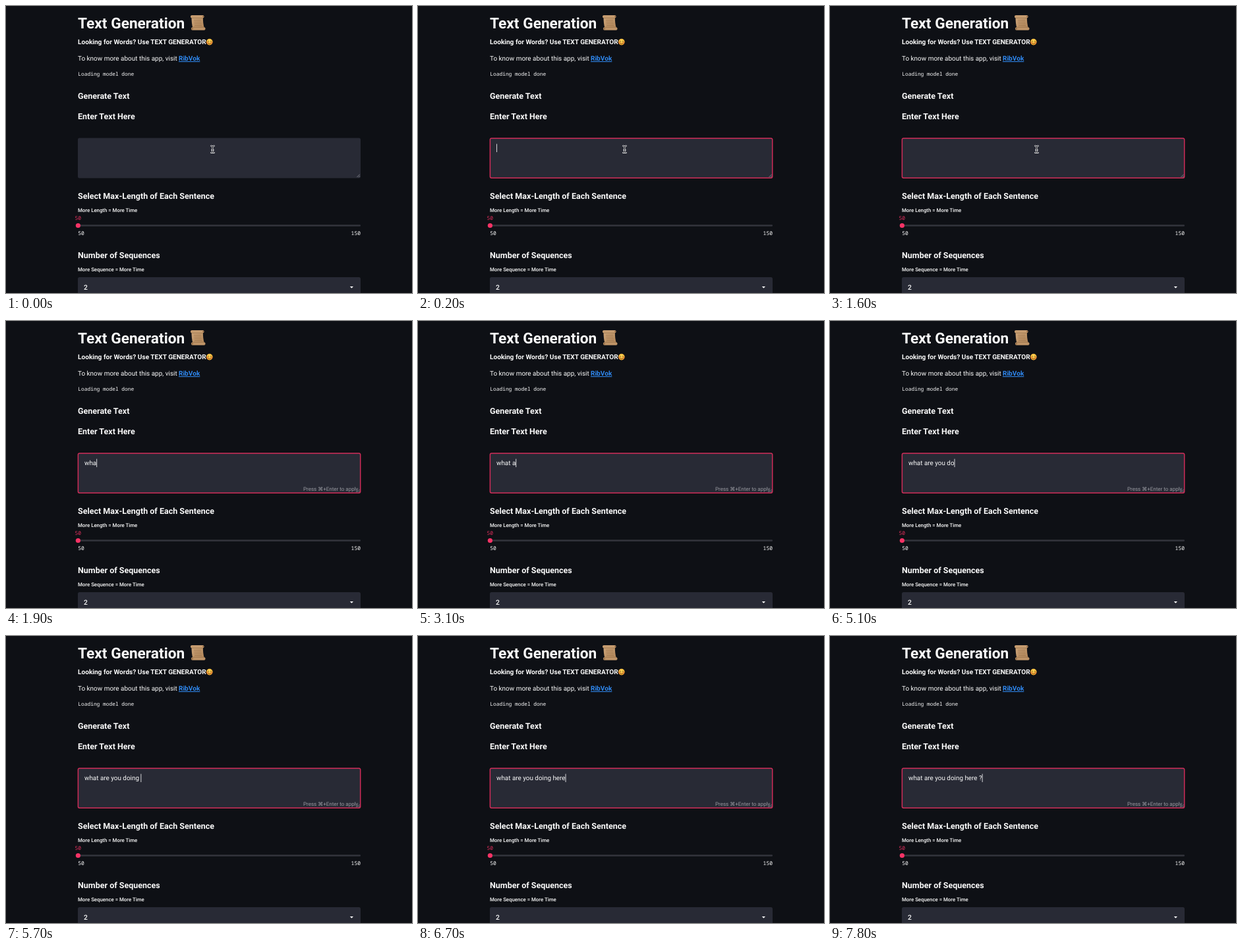
These frames come from a looping animation (616 px wide and 436 px high, 8000 ms). An HTML page:

```html
<!DOCTYPE html>
<html lang="en">
<head>
<meta charset="utf-8">
<title>Text Generation</title>
<style>
  html, body { margin: 0; width: 100%; height: 100%; overflow: hidden; background: #0e1015; }
  svg { display: block; width: 616px; height: 436px; }
  text { font-family: Roboto, "Noto Sans", sans-serif; fill: #fafafa; white-space: pre; text-rendering: geometricPrecision; }
  .title { font-size: 22.7px; font-weight: 700; }
  .bold { font-size: 10.1px; font-weight: 700; }
  .body { font-size: 9.95px; }
  .typed { font-size: 9.88px; }
  .head { font-size: 12.5px; font-weight: 600; }
  .small { font-size: 7.83px; font-weight: 500; }
  .mono { font-family: "Noto Sans Mono", "DejaVu Sans Mono", monospace; font-size: 7.87px; }
  .num { font-size: 8px; font-weight: 500; }
  .link { fill: #2f88f0; text-decoration: underline; }
  .hint { font-family: Roboto, "DejaVu Sans", sans-serif; font-size: 8px; fill: #9899a0; }
  .choice { font-size: 10.3px; font-weight: 500; }
</style>
</head>
<body>
<svg viewBox="0 0 616 436" xmlns="http://www.w3.org/2000/svg">
  <defs>
    <linearGradient id="paper" x1="0" y1="0" x2="1" y2="1">
      <stop offset="0" stop-color="#cda57a"/>
      <stop offset="1" stop-color="#b08558"/>
    </linearGradient>
    <radialGradient id="face" cx=".5" cy=".35" r=".65">
      <stop offset="0" stop-color="#ffdf5a"/>
      <stop offset="1" stop-color="#f0a028"/>
    </radialGradient>
  </defs>
  <rect width="616" height="436" fill="#0e1015"/>

  <text class="title" x="109" y="33.5">Text Generation</text>
  <g id="scroll">
    <path d="M281.5 16H299C298.6 23 299.4 28 301 34H283.5C282 28 281.5 23 281.5 16Z" fill="url(#paper)"/>
    <rect x="280" y="14" width="20.500" height="4.300" rx="2" fill="#c69c70"/>
    <path d="M282 18.300H299" stroke="#8a6540" stroke-width=".6"/>
    <rect x="281" y="32.200" width="21.500" height="4.500" rx="2" fill="#bf9467"/>
    <path d="M283 32.200H301" stroke="#8a6540" stroke-width=".6"/>
    <circle cx="299.300" cy="16.100" r="1.100" fill="#8d6540"/>
    <circle cx="282.800" cy="34.500" r="1.100" fill="#8d6540"/>
    <path d="M285 21.500H296M285.300 24.200H296.300M285.600 26.900H296.700M286 29.600H297" stroke="#9a7249" stroke-width=".7"/>
  </g>

  <text class="bold" x="109" y="58">Looking for Words? Use TEXT GENERATOR</text>
  <g id="smile" fill="none" stroke="#70401a" stroke-width=".8" stroke-linecap="round">
    <circle cx="308.800" cy="54.600" r="4.800" fill="url(#face)" stroke="none"/>
    <circle cx="305.700" cy="56" r="1.300" fill="#f0703c" stroke="none" opacity=".7"/>
    <circle cx="311.900" cy="56" r="1.300" fill="#f0703c" stroke="none" opacity=".7"/>
    <path d="M305.800 54Q306.800 52.500 307.800 54M309.800 54Q310.800 52.500 311.800 54M306.500 56.600Q308.800 59 311.100 56.600"/>
  </g>

  <text class="body" x="109" y="83">To know more about this app, visit</text>
  <text class="bold link" x="262" y="83">RibVok</text>
  <text class="mono" x="109.300" y="105.700">Loading model done</text>
  <text class="head" x="109" y="140.700">Generate Text</text>
  <text class="head" x="109" y="172.300">Enter Text Here</text>

  <rect x="109" y="200.500" width="429" height="61" rx="2.500" fill="#282a35"/>
  <rect id="ring" x="109.400" y="200.900" width="428.300" height="60.300" rx="2.200" fill="none" stroke="#cf2c58" stroke-width="1.500"/>
  <path d="M532.500 260L536.800 255.700M535 260.200L537 258.200" stroke="#92939a" stroke-width=".8"/>
  <text class="hint" id="hint" x="451" y="257.500">Press ⌘+Enter to apply</text>
  <text class="typed" id="typed" x="119" y="219"></text>
  <rect id="caret" y="209.500" width=".9" height="12.500" fill="#e8e8ea"/>
  <g id="pointer" fill="none" stroke-linecap="round">
    <path d="M311.300 212.600Q313.500 212.600 313.500 214.300Q313.500 212.600 315.700 212.600M313.500 214V221.500M311.300 222.900Q313.500 222.900 313.500 221.200Q313.500 222.900 315.700 222.900M312.400 218.800H314.600" stroke="#e4e4e6" stroke-width="2.300"/>
    <path d="M311.500 212.700Q313.500 212.700 313.500 214.300Q313.500 212.700 315.500 212.700M313.500 214V221.500M311.500 222.800Q313.500 222.800 313.500 221.200Q313.500 222.800 315.500 222.800" stroke="#14151a" stroke-width=".9"/>
  </g>

  <text class="head" x="109" y="293">Select Max-Length of Each Sentence</text>
  <text class="small" x="109" y="312.500">More Length = More Time</text>
  <text class="mono num" x="109.300" y="325" text-anchor="middle" style="fill:#e02f5d">50</text>
  <rect x="109" y="332.200" width="429" height="2.500" rx="1.200" fill="#33343c"/>
  <circle cx="109.400" cy="333.500" r="3.600" fill="#f63366"/>
  <text class="mono num" x="109.300" y="348.300">50</text>
  <text class="mono num" x="538" y="348.300" text-anchor="end">150</text>

  <text class="head" x="109" y="383.300">Number of Sequences</text>
  <text class="small" x="109" y="403">More Sequence = More Time</text>
  <rect x="109" y="412" width="429" height="30" rx="2.500" fill="#282a35"/>
  <text class="choice" x="118" y="430.700">2</text>
  <path d="M521.800 426H527L524.400 428.800Z" fill="#fafafa"/>
</svg>
<script>
  const LOOP = 8000, TICK = 100, FOCUS = 100, BLINK = 500, LEFT = 119;
  const message = "what are you doing here ?";
  // Moment each character is typed, in ticks.
  const keys = [17, 18, 19, 21, 23, 31, 33, 35, 36, 42, 43, 45, 47,
                50, 51, 53, 54, 56, 57, 62, 64, 66, 67, 74, 78];

  const el = id => document.getElementById(id);
  const ring = el("ring"), hint = el("hint"), typed = el("typed");
  const caret = el("caret"), pointer = el("pointer");
  const ramp = (t, from, span) => Math.min(1, Math.max(0, (t - from) / span));
  const fade = (node, value) => node.setAttribute("opacity", value);

  function draw(now) {
    const tick = Math.floor((now % LOOP) / TICK);
    const t = tick * TICK;
    const count = keys.filter(k => k <= tick).length;
    const since = t - (count ? keys[count - 1] * TICK : FOCUS);

    typed.textContent = message.slice(0, count);
    const width = count ? typed.getComputedTextLength() : 0;
    caret.setAttribute("x", LEFT + width);
    fade(caret, since >= 0 && since % (2 * BLINK) < BLINK ? 1 : 0);
    fade(ring, ramp(t, 50, 100));
    fade(hint, ramp(t, 1650, 200));
    // Typing hides the mouse pointer.
    fade(pointer, count ? 0 : 1);
  }

  const start = performance.now();
  function loop() {
    draw(performance.now() - start);
    requestAnimationFrame(loop);
  }
  loop();
</script>
</body>
</html>
```
